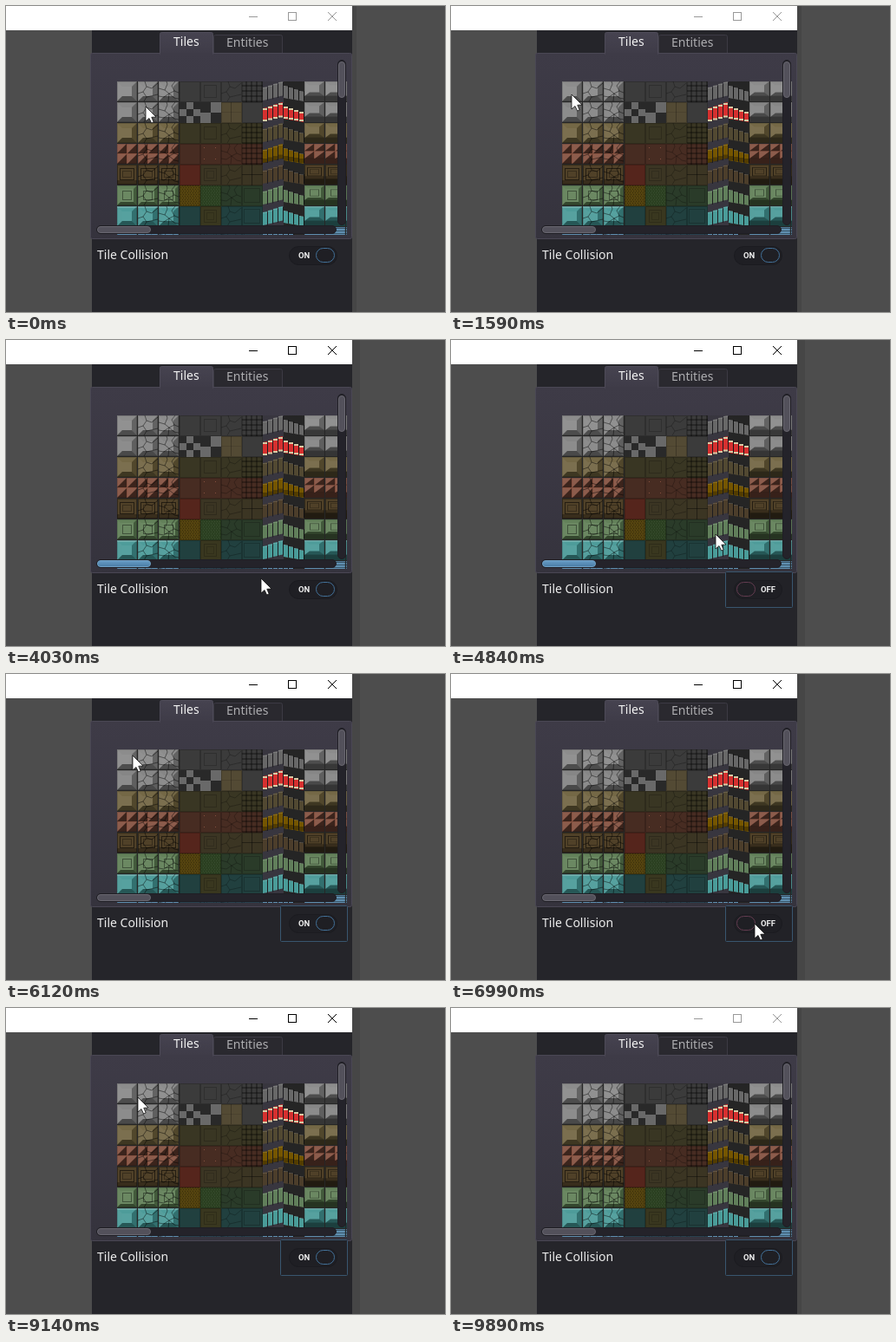
These frames come from a looping animation (506x353 px, 9950 ms). An HTML page with a canvas:

```html
<!DOCTYPE html>
<html>
<head>
<meta charset="utf-8">
<style>
html, body { margin: 0; width: 506px; height: 353px; overflow: hidden; background: #4d4d4d; }
canvas { display: block; }
</style>
</head>
<body>
<canvas id="stage" width="506" height="353"></canvas>
<script>
const W = 506, H = 353, LOOP = 9950;
const view = document.getElementById('stage').getContext('2d');
const backdrop = document.createElement('canvas');
backdrop.width = W;
backdrop.height = H;
let g = backdrop.getContext('2d');

const black = a => `rgba(0,0,0,${a})`;
const white = a => `rgba(255,255,255,${a})`;

function rect(x, y, w, h, fill) {
  g.fillStyle = fill;
  g.fillRect(x, y, w, h);
}
function box(x, y, w, h, stroke) {
  g.strokeStyle = stroke;
  g.lineWidth = 1;
  g.strokeRect(x + .5, y + .5, w - 1, h - 1);
}
function trace(pts) {
  g.beginPath();
  for (let i = 0; i < pts.length; i += 2) g.lineTo(pts[i], pts[i + 1]);
}
function poly(pts, fill) {
  trace(pts);
  g.fillStyle = fill;
  g.fill();
}
function line(pts, stroke) {
  trace(pts);
  g.strokeStyle = stroke;
  g.lineWidth = 1;
  g.stroke();
}
function pill(x, y, w, h, r, fill, stroke) {
  g.beginPath();
  g.roundRect(x + .5, y + .5, w - 1, h - 1, r);
  g.fillStyle = fill;
  g.fill();
  if (stroke) {
    g.strokeStyle = stroke;
    g.lineWidth = 1;
    g.stroke();
  }
}
function label(s, x, y, fill, font = '14px "Noto Sans"') {
  g.font = `${font}, "Open Sans", sans-serif`;
  g.fillStyle = fill;
  g.fillText(s, x, y);
}
function fade(y0, y1, from, to) {
  const f = g.createLinearGradient(0, y0, 0, y1);
  f.addColorStop(0, from);
  f.addColorStop(1, to);
  return f;
}

// wall, floor and stair colour of each tile row
const rows = [
  ['#858585', '#3b3b3b', '#686868'],
  ['#7f7f7f', '#3b3b3b', '#d6302f'],
  ['#6c5f3b', '#393623', '#524932'],
  ['#84503f', '#472c22', '#755600'],
  ['#504128', '#3b3523', '#4c3e2b'],
  ['#5a7a50', '#2a3b29', '#617f5b'],
  ['#439694', '#21403f', '#4a9c99'],
  ['#5f8fb0', '#27404e', '#5f8fb0']
];
const cracks = [
  [[0, 14, 6, 12, 10, 6, 16, 8, 23, 2], [10, 6, 8, 0], [6, 12, 10, 18, 7, 23], [10, 18, 23, 15]],
  [[0, 8, 7, 10, 12, 14, 18, 11, 23, 13], [12, 14, 11, 23], [7, 10, 10, 3, 9, 0],
   [18, 11, 15, 5, 19, 0], [12, 14, 18, 19, 23, 20], [0, 17, 6, 18, 12, 14]]
];
const crack = (n, a) => cracks[n].forEach(c => line(c, black(a)));

function pyramid(s, inset) {
  const a = inset, b = s - inset;
  poly([0, 0, s, 0, b, a, a, a], white(.06));
  poly([0, 0, a, a, a, b, 0, s], white(.1));
  poly([s, 0, s, s, b, b, b, a], black(.25));
  poly([0, s, a, b, b, b, s, s], black(.42));
  rect(a, a, b - a, b - a, white(.1));
}

function face(r) {
  rect(0, 0, 23, 23, rows[r][0]);
  if (r == 3) {
    for (const x of [0, 12]) for (const y of [0, 12]) {
      poly([x, y, x + 11, y, x, y + 11], white(.07));
      poly([x + 11, y, x + 11, y + 11, x, y + 11], black(.55));
    }
  } else if (r == 4) {
    rect(0, 18, 23, 5, black(.3));
    box(0, 0, 23, 23, black(.25));
    box(3, 4, 17, 14, black(.55));
    box(6, 7, 11, 8, black(.3));
  } else if (r == 7) {
    for (let y = 1; y < 23; y += 3) rect(0, y, 23, 1, black(.4));
  } else {
    pyramid(23, r == 5 ? 4 : 6);
    if (r == 5) box(6, 6, 11, 11, black(.4));
    if (r == 6) rect(0, 0, 23, 2, white(.2));
  }
  box(0, 0, 23, 23, black(.15));
}

function wall(c, r) {
  if (c > 8 && r < 7) {
    // lower block with its front side showing
    rect(0, 0, 23, 23, rows[r][0]);
    rect(0, 17, 23, 6, black(.58));
    g.scale(1, 17 / 23);
  }
  face(r);
  if (c == 1 || c == 2) crack(c - 1, .45);
}

function dots(color) {
  for (let y = 0; y < 23; y += 2)
    for (let x = (y / 2) % 2; x < 23; x += 3) rect(x, y, 1, 1, color);
}

function floor(c, r) {
  const special = { 43: '#55251c', 53: '#54430f', 54: '#2b4021', 64: '#39371f', 15: '#534a34' };
  rect(0, 0, 24, 24, special[r * 10 + c] || rows[r][1]);
  if (r == 1 && c < 5) {
    const s = c == 3 ? 8 : 12;
    rect(0, 0, 24, 24, '#292929');
    for (let i = 0; i < 24 / s; i++)
      for (let j = 0; j < 24 / s; j++)
        if ((i + j) % 2) rect(i * s, j * s, s, s, '#696969');
    return;
  }
  if (r == 1) {
    if (c == 5) {
      line([11.5, 0, 11.5, 23], black(.25));
      line([0, 11.5, 23, 11.5], black(.1));
    }
  } else if (r == 5 && c < 5) {
    dots(c == 3 ? black(.3) : white(.07));
  } else if (c == 4) {
    if (r == 3) {
      for (const x of [4, 17]) for (const y of [4, 17]) rect(x, y, 1, 1, '#85503f');
    } else {
      box(4, 4, 15, 15, black(.2));
      if (r > 3) box(7, 7, 9, 9, black(.15));
    }
  } else if (c == 5) {
    crack(r % 2, .25);
  } else if (c == 6) {
    if (r < 4) {
      for (let i = 4; i < 24; i += 6) {
        rect(i, 0, 2, 24, black(.3));
        rect(0, i, 24, 2, black(.3));
      }
    } else if (r == 4) {
      line([0, 11.5, 24, 11.5], black(.4));
      line([11.5, 0, 11.5, 24], black(.4));
    } else {
      box(2, 3, 19, 17, black(.2));
    }
  }
  box(0, 0, 24, 24, black(.2));
}

function stairs(c, r) {
  const up = c == 7;
  rect(0, 0, 24, 24, up ? '#38363f' : '#252525');
  for (let i = 0; i < 4; i++) {
    const x = i * 6, top = up ? 7 - i * 2 : 5 + i * 2, end = up ? 22 - i * 1.5 : 19 + i;
    const slope = up ? -1 : 1;
    poly([x, top, x + 5, top + slope, x + 5, end + slope, x, end], rows[r][2]);
    rect(x + 5, top, 1, end - top, black(.5));
    if (r == 1) {
      rect(x, top, 5, 2, '#d8cba5');
      rect(x, end - 2, 5, 2, '#d8cba5');
    } else {
      rect(x, top, 5, 1, white(.12));
      if (r == 3) rect(x, end - 5, 5, 5, black(.3));
    }
  }
}

function tileset() {
  g.save();
  g.beginPath();
  g.rect(128, 87, 265, 177);
  g.clip();
  rect(128, 87, 265, 177, '#262626');
  for (let r = 0; r < 8; r++)
    for (let c = 0; c < 12; c++) {
      g.save();
      g.translate(128 + c * 24, 87 + r * 24);
      (c < 3 || c > 8 ? wall : c < 7 ? floor : stairs)(c, r);
      g.restore();
    }
  g.restore();
}

function paintBackdrop() {
  rect(0, 0, W, H, '#4d4d4d');
  rect(0, 0, 399, 28, '#fff');
  rect(99, 28, 300, 325, '#25252a');

  pill(239, 33, 80, 26, 2, '#2a292f', '#3c3a44');
  pill(97, 54, 302, 215, 2, fade(54, 269, '#3e3b47', '#35333d'), '#4a4754');
  pill(177, 30, 62, 27, 2, fade(30, 57, '#464350', '#3e3b47'), '#4d4a57');
  rect(178, 54, 60, 4, '#3e3b47');
  label('Tiles', 193, 46, '#f2f2f2');
  label('Entities', 254, 47, '#adadb0');

  tileset();
  pill(382, 62, 10, 191, 5, '#24232a', '#1f1e24');
  pill(383, 64, 8, 42, 4, '#53515b', '#68666f');
  pill(104, 253, 277, 10, 5, '#24232a', '#1f1e24');
  label('Tile Collision', 105, 292, '#ececec');
}

// [start, end, x, y, easing]
const linear = p => p;
const smooth = p => p * p * (3 - 2 * p);
const slow = p => 1 - (1 - p) ** 2;
const moves = [
  [340, 400, 161, 118, linear],
  [1290, 1590, 139, 102, smooth],
  [1920, 2280, 166, 147, smooth],
  [2770, 2800, 166, 145, linear],
  [2800, 3270, 135, 100, smooth],
  [3270, 3520, 142, 94, slow],
  [3790, 4030, 294, 275, smooth],
  [4030, 4330, 358, 292, slow],
  [4660, 4840, 306, 225, p => p * p],
  [4840, 5310, 170, 87, slow],
  [5310, 5550, 165, 97, smooth],
  [5760, 6120, 146, 94, smooth],
  [6330, 6990, 350, 288, smooth],
  [7140, 7810, 165, 94, smooth],
  [8120, 8410, 142, 94, smooth],
  [9110, 9400, 458, 362, smooth]
];
function pointer(t) {
  let x = 161, y = 116;
  for (const [from, to, tx, ty, ease] of moves) {
    if (t < from) break;
    const p = ease(Math.min(1, (t - from) / (to - from)));
    x += (tx - x) * p;
    y += (ty - y) * p;
  }
  return [Math.round(x), Math.round(y)];
}

const within = (t, spans) => spans.some(([a, b]) => t >= a && t < b);
const offSpans = [[2460, 3790], [4540, 5730], [6300, 7140]];
const hoverSpans = [[4000, 4090], [4780, 4870], [6690, 6780]];

function windowFrame(active) {
  rect(399, 0, active ? 9 : 5, H, black(.09));
  const ink = active ? '#000' : '#999';
  rect(280, 12, 10, 1, ink);
  box(325, 7, 10, 10, ink);
  line([371, 7, 381, 17], ink);
  line([381, 7, 371, 17], ink);
}

function toggle(on, ringed) {
  if (ringed) pill(316, 267, 78, 42, 1, '#222227', '#39566f');
  pill(326, 277, 56, 22, 11, '#1f1f24', '#1b1b20');
  pill(on ? 357 : 329, 279, 22, 17, 8, '#1f1f24', on ? '#427199' : '#633c50');
  label(on ? 'ON' : 'OFF', on ? 337 : 357, 291, '#eee', 'bold 9.5px Roboto');
}

function cursor(x, y) {
  g.save();
  g.translate(x, y);
  poly([0, 0, 0, 17, 4, 13.5, 6.6, 19, 9.2, 18, 6.8, 12.3, 12, 12], '#fff');
  g.closePath();
  g.strokeStyle = '#111';
  g.lineWidth = .8;
  g.stroke();
  g.restore();
}

function draw(now) {
  const t = now % LOOP;
  g.drawImage(backdrop, 0, 0);
  windowFrame(t >= 1860 && t < 9890);
  if (within(t, hoverSpans)) pill(105, 254, 62, 8, 4, fade(254, 262, '#6a9fc8', '#477aa3'), '#6f9fc3');
  else pill(105, 254, 62, 8, 4, '#53515b', '#68666f');
  toggle(!within(t, offSpans), t >= 4480);
  if (t < 9400) cursor(...pointer(t));
}

paintBackdrop();
g = view;
const start = performance.now();
function tick() {
  draw(performance.now() - start);
  requestAnimationFrame(tick);
}
tick();
</script>
</body>
</html>
```
